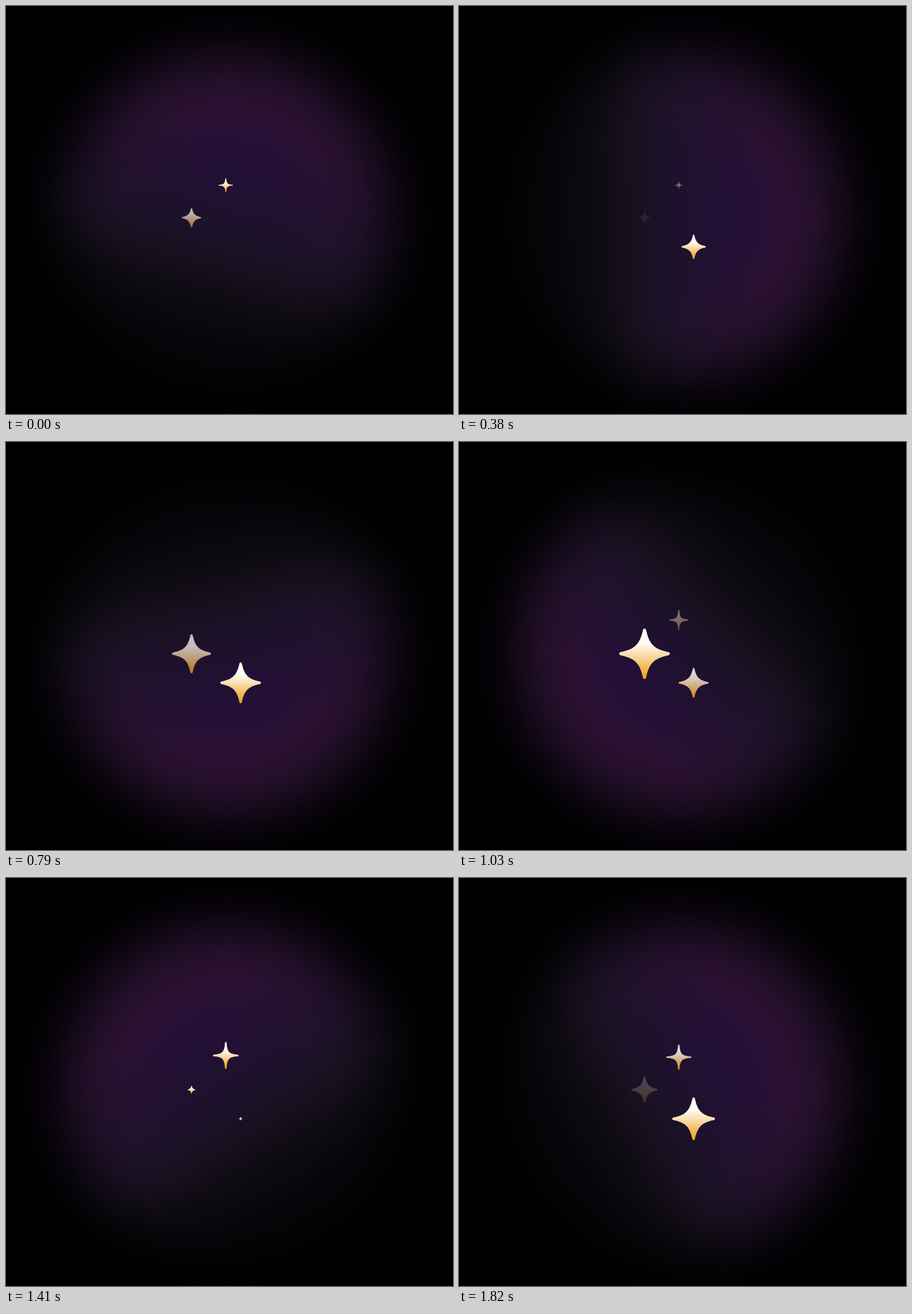
An HTML page for the animation above (1.85 s loop, 783 by 715 pixels).

```html
<!DOCTYPE html>
<html lang="en">
<head>
<meta charset="utf-8">
<title>Sparkles</title>
<style>
html, body { margin: 0; width: 100%; height: 100%; overflow: hidden; background: #000; }
svg { display: block; width: 100%; height: 100%; }
</style>
</head>
<body>
<svg viewBox="0 0 783 715">
  <defs>
    <radialGradient id="glow" gradientUnits="userSpaceOnUse" cx="0" cy="0" r="365">
      <stop offset="0" stop-color="#230f3d"/>
      <stop offset=".3" stop-color="#260f39"/>
      <stop offset=".58" stop-color="#2b1131"/>
      <stop offset="1" stop-color="#20102c"/>
    </radialGradient>
    <!-- Darkens the side away from the light; the light points along +x -->
    <linearGradient id="shade" gradientUnits="userSpaceOnUse" x1="-350" y1="0" x2="150" y2="0">
      <stop offset="0" stop-color="#040306"/>
      <stop offset=".26" stop-color="#08060b"/>
      <stop offset=".42" stop-color="#0f0b13"/>
      <stop offset=".54" stop-color="#17111f" stop-opacity=".95"/>
      <stop offset=".66" stop-color="#1b1227" stop-opacity=".8"/>
      <stop offset=".82" stop-color="#1d1129" stop-opacity=".4"/>
      <stop offset="1" stop-color="#1d1129" stop-opacity="0"/>
    </linearGradient>
    <radialGradient id="edge" gradientUnits="userSpaceOnUse" cx="0" cy="0" r="365">
      <stop offset=".5" stop-opacity="0"/>
      <stop offset=".65" stop-opacity=".14"/>
      <stop offset=".76" stop-opacity=".42"/>
      <stop offset=".87" stop-opacity=".76"/>
      <stop offset="1" stop-opacity="1"/>
    </radialGradient>
    <linearGradient id="gold" x1="0" y1="0" x2="0" y2="1">
      <stop offset="0" stop-color="#d8eca4"/>
      <stop offset=".1" stop-color="#fff"/>
      <stop offset=".3" stop-color="#fffaf2"/>
      <stop offset=".52" stop-color="#f9dcae"/>
      <stop offset=".76" stop-color="#f4ba5c"/>
      <stop offset="1" stop-color="#ee9f1c"/>
    </linearGradient>
  </defs>
  <rect width="783" height="715"/>
  <g id="orb">
    <circle r="365" fill="url(#glow)"/>
    <circle r="366" fill="url(#shade)"/>
    <circle r="367" fill="url(#edge)"/>
  </g>
  <g id="stars" fill="url(#gold)"></g>
</svg>
<script>
const LOOP = 1850;
const TURN = 1600;
const orb = document.getElementById('orb');
const layer = document.getElementById('stars');
const clamp = v => Math.max(0, Math.min(1, v));

// A pulse swells and shrinks along half a sine wave.
// fade: the progress at which it is clear, then the one at which it is solid.
const pulse = (start, length, size, fade, lift = 0) => ({ start, length, size, fade, lift });
const fadeIn = [0, .36], fadeOut = [.93, .7], slowOut = [.9, .05], earlyOut = [.72, .35];

const stars = [
  { x: 385, y: 314, waist: .26, pulses: [
    pulse(-585, 1170, 12.5, fadeOut),
    pulse(940, 600, 36, fadeIn, .13),
    pulse(1590, 755, 27, fadeIn)] },
  { x: 325, y: 371, waist: .335, pulses: [
    pulse(-245, 755, 20, slowOut),
    pulse(590, 755, 46, fadeIn),
    pulse(1345, 742, 25.5, earlyOut)] },
  { x: 411, y: 422, waist: .335, pulses: [
    pulse(136, 1208, 36, fadeOut),
    pulse(1392, 698, 40, fadeOut)] }
];

// Four-pointed star of radius 1 with blunt tips; waist sets its fullness
function starPath(waist) {
  const sum = (8 * waist - 1.01) / 3;
  const a = sum * .32, b = sum - a;
  const tip = .06, end = .95;
  let path = `M${-tip} ${-end}`;
  for (let i = 0; i < 4; i++) {
    const c = Math.round(Math.cos(i * Math.PI / 2));
    const s = Math.round(Math.sin(i * Math.PI / 2));
    const at = (x, y) => `${x * c - y * s} ${x * s + y * c} `;
    path += 'C' + at(-tip * .8, -1.015) + at(tip * .8, -1.015) + at(tip, -end)
      + 'C' + at(a, -b) + at(b, -a) + at(end, -tip);
  }
  return path + 'Z';
}

for (const star of stars) {
  star.node = document.createElementNS('http://www.w3.org/2000/svg', 'path');
  star.node.setAttribute('d', starPath(star.waist));
  layer.append(star.node);
}

function drawStar({ node, x, y, pulses }, t) {
  const active = pulses.find(p => t > p.start && t < p.start + p.length);
  node.setAttribute('visibility', active ? 'visible' : 'hidden');
  if (!active) return;
  const { start, length, size, fade: [clear, solid], lift } = active;
  const progress = (t - start) / length;
  const radius = size * Math.sin(Math.PI * progress);
  node.setAttribute('transform',
    `translate(${x} ${y - lift * radius}) scale(${radius} ${radius * (1 + lift / 2)})`);
  node.setAttribute('opacity', clamp((progress - clear) / (solid - clear)));
}

function draw(t) {
  const turns = t / TURN;
  const angle = -75 + 360 * turns - 13 * (1 - Math.cos(2 * Math.PI * turns));
  orb.setAttribute('transform', `translate(388 368) rotate(${angle})`);
  for (const star of stars) drawStar(star, t);
}

const start = performance.now();
function tick() {
  draw((performance.now() - start) % LOOP);
  requestAnimationFrame(tick);
}
tick();
</script>
</body>
</html>
```
